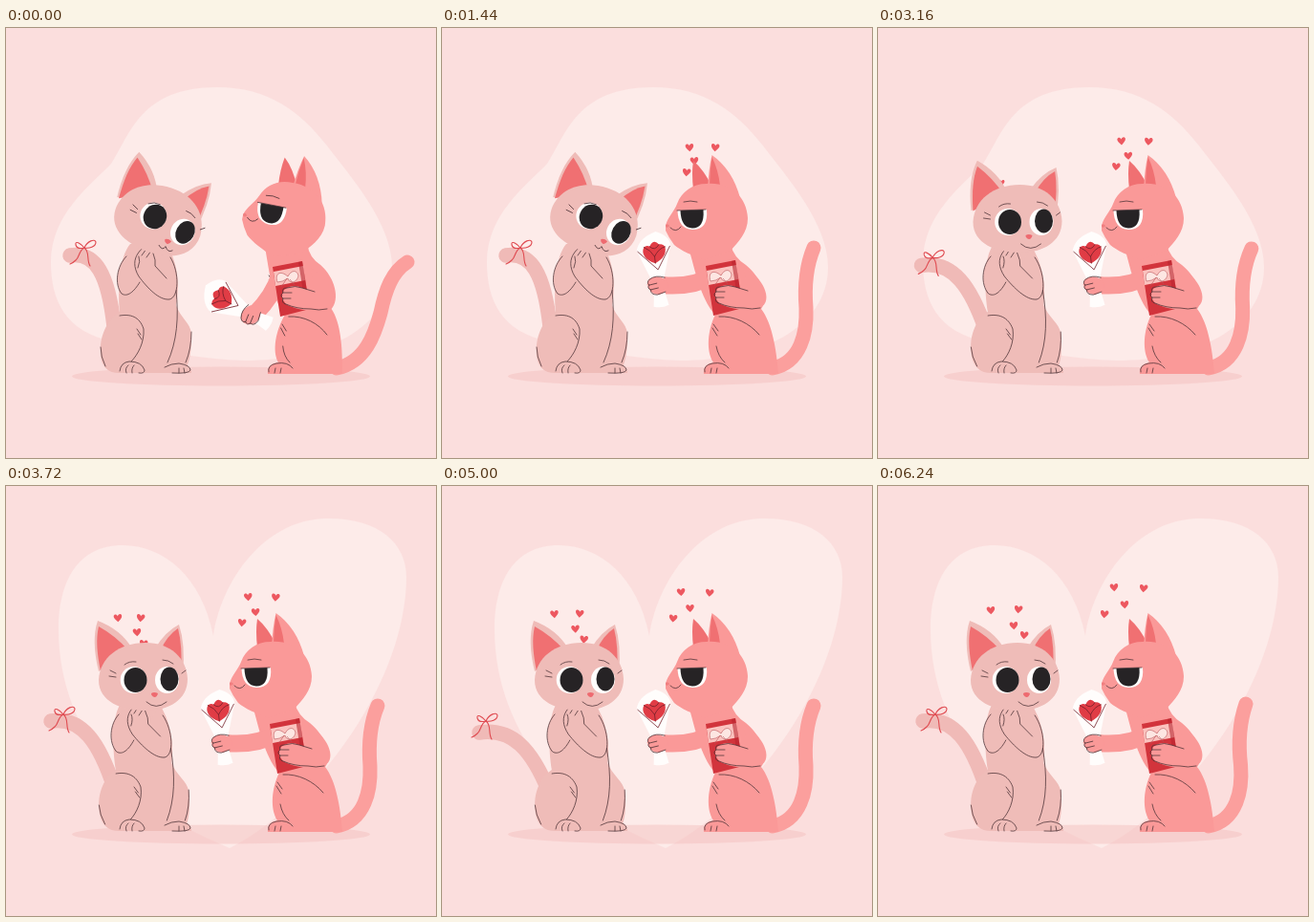
These frames come from a looping animation (450 by 450 pixels, 6.28 s). An HTML page:

```html
<!DOCTYPE html>
<html lang="en">
<head>
<meta charset="utf-8">
<title>Two cats in love</title>
<style>
html, body { margin: 0; width: 100%; height: 100%; overflow: hidden; background: #fbdedd; }
svg { display: block; width: 100vw; height: 100vh; }
.ln { fill: none; stroke: #4a3034; stroke-width: .75; stroke-linecap: round; stroke-linejoin: round; }
.a { fill: #efbcb8; }
.b { fill: #fa9998; }
.ear { fill: #f07072; }
.limb { fill: none; stroke-linecap: round; stroke-linejoin: round; }
.bow { fill: none; stroke: #df4a50; stroke-width: 1.1; stroke-linecap: round; }
.white { fill: #fffdfc; }
.pupil { fill: #262325; }
.heart { fill: #ed5860; }
</style>
</head>
<body>
<svg viewBox="0 0 450 450" preserveAspectRatio="xMidYMid meet">
  <rect width="450" height="450" fill="#fbdedd"/>
  <path id="backdrop" fill="#fdebe9"/>
  <ellipse cx="225" cy="364.500" rx="156" ry="10" fill="#f3bfbd" opacity=".48"/>
  <g id="hearts"></g>

  <!-- left cat -->
  <path id="tailA" class="limb" stroke="#f0bab7" stroke-width="15.500"/>
  <g id="bow" class="bow">
    <path d="M0,0C-4,-5 -10,-8 -9,-3C-8,1 -4,1 0,0C3,-7 11,-10 12,-6C12,-1 5,1 0,0"/>
    <path d="M0,0C-6,3 -5,10 -9,13Q-12,16 -15,17M0,0C6,4 2,13 6,19"/>
  </g>
  <g id="bodyA">
    <path class="a" d="M130,226C118,240 117,275 119,297C102,308 96,330 100,348Q104,361 118,361L186,361Q195,346 194,320C193,308 182,303 178,290C182,270 180,245 168,226Z"/>
    <path class="ln" d="M119,301C130,299 140,302 144,315C145,329 138,342 131,349M178,274C181,303 179,328 169,350M194,318Q194,336 188,350M137,315L141,321M138,320L142,326M99,334Q99,344 104,354"/>
    <path class="a" d="M129,235C116,246 113,268 121,278C128,283 137,273 142,262L142,236Z"/>
    <path class="a" d="M166,234C181,246 183,280 171,284C160,284 148,274 138,258L133,238Q145,226 153,232Q158,243 156,250Z"/>
    <path class="ln" d="M126,239C116,249 113,268 121,278C127,282 134,276 140,266M172,240C182,256 181,282 171,284C160,285 148,272 139,260C133,250 134,242 138,236Q143,228 147,231Q154,229 154,236Q157,243 156,249L168,262M142,238L147,231M147,240L152,233M139,239Q141,244 138,251"/>
  </g>
  <path class="a" d="M119,361Q118,350 128,349Q142,348 146,361ZM162,361Q166,351 179,351Q194,351 194,361Z"/>
  <path class="ln" d="M119,359Q120,350 129,349Q142,349 145,358Q145,362 139,361M126,361Q124,356 128,353M132,361Q131,356 134,353M166,355Q173,351 181,351Q193,353 193,358Q192,362 174,361M181,361L181,356M187,361L186,356"/>
  <g id="headA">
    <g id="earL">
      <path class="a" d="M97,194C92,174 91,155 96,141Q120,150 132,170Z"/>
      <path class="ear" d="M99,194C95,174 94,160 97,147Q115,157 128,172Z"/>
    </g>
    <g id="earR">
      <path class="a" d="M156,170Q167,152 181,145Q188,166 185,196Z"/>
      <path class="ear" d="M161,173Q169,156 180,149Q185,168 183,196Z"/>
    </g>
    <path class="a" d="M97,203C98,180 118,164 146,164C172,164 189,180 190,202C190,224 170,235 147,235C121,235 97,226 97,203Z"/>
    <g id="face">
      <g id="eyes">
        <ellipse class="white" cx="133.500" cy="203" rx="13.800" ry="14"/>
        <ellipse class="pupil" cx="135.500" cy="203" rx="12" ry="13"/>
        <ellipse class="white" cx="168.500" cy="203" rx="12.500" ry="14"/>
        <ellipse class="pupil" cx="171" cy="202" rx="9.500" ry="12.500"/>
      </g>
      <path class="ln" d="M124,187Q129,183 136,184M164,182Q170,182 175,186M115,196L109,193M115,200L108,199M184,196L188,193"/>
      <path fill="#ee6a70" d="M152,217Q155,215 159,217Q158,221 155.500,221Q152,220 152,217Z"/>
      <path id="mouth" class="ln"/>
    </g>
  </g>

  <!-- right cat -->
  <path id="tailB" class="limb" stroke="#fb9f9d" stroke-width="15"/>
  <g id="bodyB">
    <path class="b" d="M256,222C264,250 270,283 286,300C278,316 276,338 284,350L284,362L352,362C350,335 345,308 334,294C342,284 335,262 318,248Q305,240 302,226Z"/>
    <path class="ln" d="M290,302C306,301 322,309 332,321M284,310L289,317M283,314L288,322M287,333Q289,344 296,350M265,259L270,265M266,264L272,270"/>
  </g>
  <path class="b" d="M274,362Q273,352 284,350Q298,348 302,362Z"/>
  <path class="ln" d="M275,360Q273,353 283,351Q295,349 300,356M281,361L282,356M287,361L288,356"/>
  <path id="arm" class="limb" stroke="#fa9998" stroke-width="18"/>
  <g id="headB">
    <path id="earBack" class="ear" d="M263,169Q261,152 263,139Q274,148 283,167Z"/>
    <path class="b" d="M278,168Q279,148 282.500,133Q304,148 312,178Z"/>
    <path class="ear" d="M280,166Q280,150 282.500,135Q289,148 291,165Z"/>
    <path class="b" d="M234,207C236,198 243,192 246,184C251,171 262,163 277,163C302,161 319,177 320,199C320,214 310,224 302,233L275,243C262,238 250,233 243,227Q237,219 234,212Z"/>
    <path class="white" d="M246.500,191L277,190Q279,211 262,211Q247,210 246.500,191Z"/>
    <path class="pupil" d="M249.500,191L273.500,190Q275,209.500 262,209.500Q250,209 249.500,191Z"/>
    <path class="ln" d="M246,191L276,190M253,182Q260,180 267,182M239,209Q245,215 250,208"/>
    <path fill="#f07f80" d="M234,206Q236,204 238,207Q236,210 234,208Z"/>
  </g>
  <g id="gift">
    <path fill="#d2343c" d="M278,251L309,245L317,295L286,303Z"/>
    <path fill="#fbc3bf" d="M279,256L310,250L312,265L281,271Z"/>
    <path fill="#b9242e" d="M309,245L317,295L313,296L305,246Z" opacity=".6"/>
    <path fill="#fde6e2" stroke="#b9545a" stroke-width=".6" d="M294,261C286,254 280,258 283,267Q288,267 294,263C296,270 304,267 305,260C303,253 297,255 294,261M293,263L287,272M296,264L301,270"/>
    <path class="b" d="M318,252C337,262 350,287 335,295C322,299 302,296 292,290Q285,283 290,275Q299,268 309,273L321,277Z"/>
    <path class="ln" d="M335,295Q326,297 318,295Q303,295 292,290Q287,289 289,284Q285,281 289,278Q287,273 293,273Q302,270 309,273L322,277M289,284L297,284M289,278L298,278"/>
  </g>
  <g id="flower">
    <path class="white" d="M-4,0L-18,-38Q-15,-51 4,-56Q18,-50 18,-40L5,0L9,22Q1,25 -7,22Z"/>
    <path fill="#e03c45" d="M0,-23C-10,-27 -14,-35 -10,-41Q-6,-43 -4,-41Q1,-49 6,-42Q10,-43 12,-39C13,-31 8,-26 0,-23Z"/>
    <path class="ln" style="stroke:#73212a" d="M-10,-41Q-3,-37 0,-30Q5,-38 12,-39M-4,-41Q1,-35 6,-42M0,-30L0,-23M-17,-37L2,-16L17,-39"/>
    <path class="b" d="M-11,-2Q-10,-9 -1,-9Q9,-8 11,0Q10,9 0,10Q-10,9 -11,-2Z"/>
    <path class="ln" d="M8,-7Q-1,-11 -8,-7Q-12,-4 -9,-1Q-12,2 -8,4Q-9,9 -2,10L7,8M-9,-1L-1,-2M-8,4L0,3"/>
  </g>
</svg>
<script>
const $ = id => document.getElementById(id);
const LOOP = 6280, STEP = 40;
const set = (id, name, value) => $(id).setAttribute(name, value);
const move = (id, value) => set(id, 'transform', value);
const clamp = x => Math.max(0, Math.min(1, x));
const lerp = (a, b, p) => a + (b - a) * p;
const ramp = (t, a, b) => clamp((t - a) / (b - a));
const smooth = p => p * p * (3 - 2 * p);
const ease = (t, a, b) => smooth(ramp(t, a, b));
const bump = (t, mid, half) => smooth(clamp(1 - Math.abs(t - mid) / half));

// blend two paths of equal structure
const NUM = /-?[\d.]+/g;
function mix(a, b, p) {
  const n = b.match(NUM);
  let i = 0;
  return a.replace(NUM, v => lerp(+v, +n[i++], p).toFixed(2));
}

const BLOB = 'M221,62C275,62 308,88 335,122C362,157 404,205 404,250C404,315 330,348 250,348C205,347 160,338 112,328C62,318 47,285 47,245C47,195 88,165 110,142C130,112 140,62 221,62Z';
const HEART = 'M217,157C225,100 270,35 335,34C390,33 419,60 419,95C419,200 330,330 234,379C190,360 140,335 108,296C75,255 55,205 55,150C55,100 75,62 122,62C165,62 205,95 217,157Z';
const TAIL_A = ['M67,238C94,234 107,258 113,312', 'M47,246C80,241 98,270 113,315', 'M39,258C74,253 94,276 112,320'];
const TAIL_B = ['M346,356C376,350 386,320 392,298C397,274 404,255 420,245', 'M346,356C376,350 382,318 381,293C379,268 381,249 389,230'];
const ARM = ['M287,257Q280,280 260,296', 'M284,259Q262,272 230,270'];
const MOUTHS = ['M148,225Q153,230 155,224Q159,230 163,226', 'M147,226Q157,235 168,226'];

// x, y at the first time; x, y at the last time
const groups = [
  { start: 680, gap: 50, rise: 170, t0: 1440, from: [270, 170],
    list: [[259, 125, 247, 106], [286, 125, 278, 107], [264, 139, 258, 124], [256, 151, 237, 134]] },
  { start: 3115, gap: 60, rise: 230, t0: 3720, from: [136, 174],
    list: [[117, 138, 118, 130], [141, 138, 147, 129], [137, 153, 142, 146], [144, 165, 153, 156]] }
];
for (const g of groups) {
  g.nodes = g.list.map(() => {
    const n = document.createElementNS('http://www.w3.org/2000/svg', 'path');
    n.setAttribute('class', 'heart');
    n.setAttribute('d', 'M0,4.800C-3,2 -5.200,0 -4.800,-2.500C-4,-5 -1,-4.600 0,-2C1.200,-4.800 4.300,-5 4.900,-2.300C5.200,0 3,2 0,4.800Z');
    return $('hearts').appendChild(n);
  });
}

function drawHearts(t) {
  for (const g of groups) g.list.forEach(([x0, y0, x1, y1], i) => {
    const begin = g.start + i * g.gap;
    const p = ramp(t, begin, begin + g.rise);
    const q = 1 - (1 - p) * (1 - p);
    const drift = (t - g.t0) / (6240 - g.t0);
    const x = lerp(g.from[0], lerp(x0, x1, drift), q);
    const y = lerp(g.from[1], lerp(y0, y1, drift), q);
    const size = .88 * Math.min(1, 2.2 * q);
    g.nodes[i].setAttribute('transform', `translate(${x} ${y}) rotate(${i % 2 ? 5 : -4}) scale(${size})`);
  });
}

function drawLeft(t) {
  const turn = ease(t, 2920, 3130), back = 1 - turn;
  const wag = ease(t, 4360, 5000) * (1 - ease(t, 5000, 5680));
  const low = wag + .2 * bump(t, 3170, 160) * turn;
  set('tailA', 'd', mix(mix(TAIL_A[0], TAIL_A[1], turn), TAIL_A[2], low));
  move('bow', `translate(${lerp(lerp(82, 60, turn), 46, low)} ${lerp(lerp(230, 239, turn), 246, low)})`);

  const k = .066 * turn;
  move('bodyA', `matrix(1 0 ${k} 1 ${-360 * k} 0)`);
  const lag = turn * (1 - ease(t, 3160, 3560));
  move('headA', `translate(${15 * back + 2.5 * lag} ${3 * back}) rotate(${18 * back} 150.5 203)`);
  move('face', `translate(${4 * back} 0)`);
  move('earL', `rotate(${9 * back + 8 * lag} 115 178)`);
  move('earR', `rotate(${5 * back + 5 * lag} 170 180)`);
  const open = 1 - .92 * bump(t, 1660, 140);
  move('eyes', `translate(${-back} ${205 * (1 - open) - 2 * back}) rotate(${11 * back} 152 203) scale(1 ${open})`);
  set('mouth', 'd', MOUTHS[turn > .5 ? 1 : 0]);
}

function drawRight(t) {
  const p = ease(t, 400, 980), back = 1 - p;
  const wag = .13 * (bump(t, 2120, 560) + bump(t, 4240, 560) + ease(t, 5560, 6200)) - .12 * bump(t, 2960, 400);
  set('tailB', 'd', mix(TAIL_B[0], TAIL_B[1], p + wag));
  const k = -.1 * back;
  move('bodyB', `matrix(1 0 ${k} 1 ${-360 * k} 0)`);
  move('headB', `translate(${15 * back} ${-5 * back}) rotate(${13 * back} 263 200)`);
  move('earBack', `rotate(${-36 * bump(t, 2120, 160)} 273 167)`);
  move('gift', `translate(${3 * back - 2} ${back - 2})`);

  const arc = Math.sin(Math.PI * p);
  const x = lerp(256, 226, p) - 10 * arc, y = lerp(300, 269, p) + 3 * arc;
  set('arm', 'd', mix(ARM[0], ARM[1], p).replace(/[^ ]+$/, `${x + 4},${y}`));
  move('flower', `translate(${x} ${y}) rotate(${lerp(-61, -6.7, p)})`);
}

function draw(t) {
  set('backdrop', 'd', mix(BLOB, HEART, ease(t, 3180, 3520)));
  drawHearts(t);
  drawLeft(t);
  drawRight(t);
}

const begun = performance.now();
function tick() {
  const t = (performance.now() - begun) % LOOP;
  draw(Math.floor(t / STEP) * STEP);
  requestAnimationFrame(tick);
}
tick();
</script>
</body>
</html>
```
